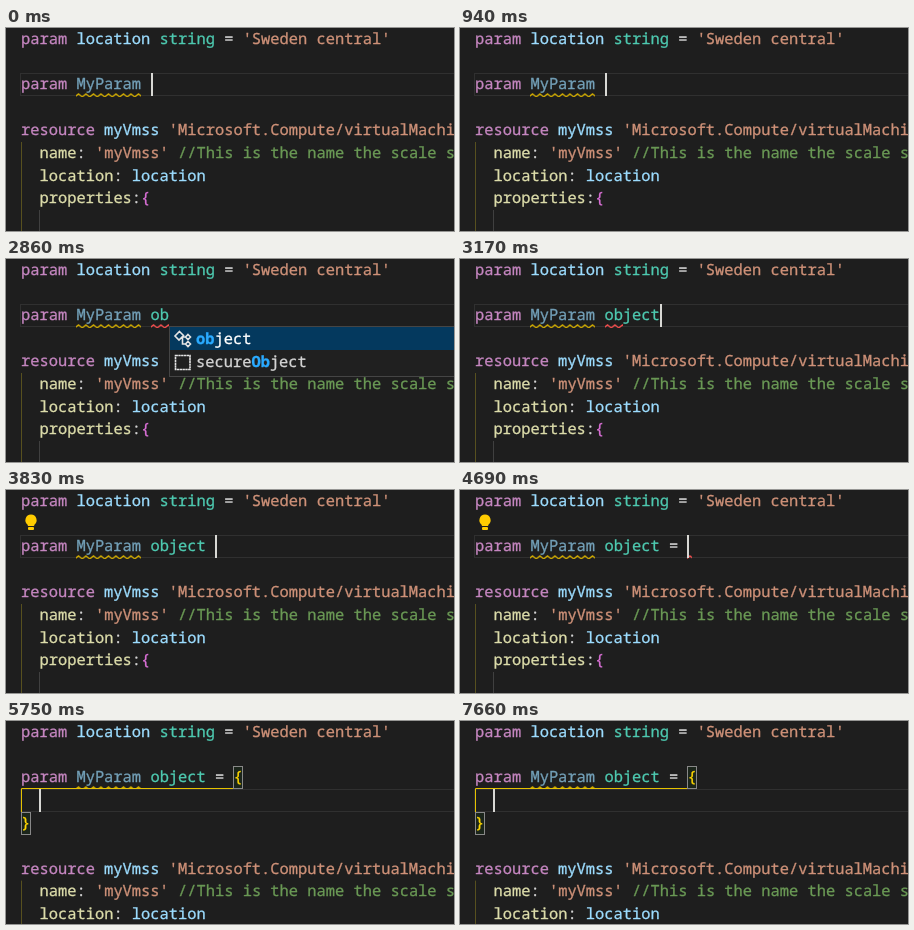
These frames come from a looping animation (448 px wide and 203 px high, 8000 ms). An HTML page:

```html
<!DOCTYPE html>
<html lang="en">
<head>
<meta charset="utf-8">
<title>Typing an object parameter</title>
<style>
  html, body { margin: 0; width: 100%; height: 100%; overflow: hidden; background: #1e1e1e; }
  svg { display: block; width: 448px; height: 203px; }
  text {
    font: 15.4px "Noto Sans Mono", "DejaVu Sans Mono", monospace;
    white-space: pre;
    text-rendering: geometricPrecision;
    color: #d4d4d4;
  }
  text, tspan { fill: currentColor; stroke: currentColor; stroke-width: .3; }
  .kw { color: #c586c0; }
  .var { color: #9cdcfe; }
  .unused { color: #73a0b8; }
  .type { color: #4ec9b0; }
  .str { color: #ce9178; }
  .note { color: #6a9955; }
  .prop { color: #dcdcaa; }
  .gold { color: #ffd700; }
  .pink { color: #da70d6; }
  .white { color: #fff; }
  .hit { color: #2aaaff; font-weight: 700; }
  .guide { stroke: #404040; }
  .pair { fill: none; stroke: #e6c200; }
  .dim { stroke: #57501f; }
  .line { fill: none; stroke: #303030; }
  .cursor { fill: #d8d8d4; }
  .box { fill: rgba(0, 100, 0, .1); stroke: #888; }
  .panel { fill: #202020; stroke: #454545; }
  .picked { fill: #04395e; }
  .icon { fill: none; stroke: #e4e4e4; stroke-width: 1.6; }
  .wave { fill: none; stroke-width: 1.3; }
  [data-on] { visibility: hidden; }
</style>
</head>
<body>
<svg viewBox="0 0 448 203">
  <defs>
    <pattern id="warn" width="7.5" height="4" x="70" y="65" patternUnits="userSpaceOnUse">
      <path class="wave" d="M-1.25 3.9 L0 2.9 L2.5 .9 L6.25 3.9 L8.75 1.9" stroke="#cca700"/>
    </pattern>
    <pattern id="error" width="7.5" height="4" x="145" y="65" patternUnits="userSpaceOnUse">
      <path class="wave" d="M-1.25 3.9 L0 2.9 L2.5 .9 L6.25 3.9 L8.75 1.9" stroke="#f14c4c"/>
    </pattern>
    <path id="classIcon" class="icon" d="M5.5 .5 L9.5 4.5 L5 9 L1 5 Z M8 6 H12 M8.5 6 V13 H12 M14 3.5 L16.5 6 L14 8.5 L11.5 6 Z M14 10.5 L16.5 13 L14 15.5 L11.5 13 Z"/>
    <path id="snippetIcon" class="icon" d="M1 12 V1 H14 V12 M1 14 H14" stroke-dasharray="3 .8"/>
    <path id="functionIcon" d="M8 0 L15 4 V11 L8 15 L1 11 V4 Z M1 4 L8 8 L15 4 M8 8 V15" fill="none" stroke="#b180d7" stroke-width="1.3"/>
  </defs>

  <!-- Current line -->
  <rect class="line" x="14.5" y="45.5" width="440" height="22" data-on="0-5750"/>
  <rect class="line" x="14.5" y="68.5" width="440" height="22" data-on="5750-8000"/>

  <!-- Parameters -->
  <text x="15" y="15.75"><tspan class="kw">param</tspan> <tspan class="var">location</tspan> <tspan class="type">string</tspan> = <tspan class="str">'Sweden central'</tspan></text>
  <text x="15" y="61.35"><tspan class="kw">param</tspan> <tspan class="unused">MyParam</tspan></text>
  <rect x="70" y="65" width="65" height="4" fill="url(#warn)" data-on="0-5750"/>
  <rect x="70" y="65" width="65" height="2" fill="url(#warn)" data-on="5750-8000"/>

  <!-- Resource, pushed down by the two new lines -->
  <g id="resource">
    <path class="dim" d="M15.5 114 V203"/>
    <path class="guide" d="M33.5 182 V203"/>
    <text x="15" y="106.95"><tspan class="kw">resource</tspan> <tspan class="var">myVmss</tspan> <tspan class="str">'Microsoft.Compute/virtualMachineScaleSets</tspan></text>
    <text x="33.5" y="129.75"><tspan class="prop">name</tspan>: <tspan class="str">'myVmss'</tspan> <tspan class="note">//This is the name the scale set</tspan></text>
    <text x="33.5" y="152.55"><tspan class="prop">location</tspan>: <tspan class="var">location</tspan></text>
    <text x="33.5" y="175.35"><tspan class="prop">properties</tspan>:<tspan class="pink">{</tspan></text>
  </g>

  <!-- Typed text -->
  <text x="144.4" y="61.35" data-on="2170-2290"><tspan class="var">o</tspan></text>
  <text x="144.4" y="61.35" data-on="2290-3170"><tspan class="type">ob</tspan></text>
  <text x="144.4" y="61.35" data-on="3170-8000"><tspan class="type">object</tspan></text>
  <text x="209" y="61.35" data-on="4250-8000">=</text>
  <g fill="url(#error)">
    <rect x="145" y="65" width="9" height="4" data-on="2220-2490"/>
    <rect x="145" y="65" width="18" height="4" data-on="2490-3230"/>
    <rect x="218" y="65" width="5" height="4" data-on="4310-4570"/>
    <rect x="227" y="65" width="5" height="4" data-on="4570-5750"/>
  </g>

  <!-- Bracket pair -->
  <g data-on="5750-8000">
    <path class="pair" d="M228 67.5 H15.5 V91"/>
    <rect class="box" x="227.5" y="45.5" width="9" height="22"/>
    <rect class="box" x="15.5" y="91.5" width="9" height="22"/>
    <text x="227.5" y="61.35"><tspan class="gold">{</tspan></text>
    <text x="15" y="106.95"><tspan class="gold">}</tspan></text>
  </g>

  <!-- Light bulb -->
  <g fill="#ffcc00" data-on="3470-4070 4690-5000">
    <path d="M25 24.5 A5.8 5.8 0 0 1 28.2 35 V36 H21.8 V35 A5.8 5.8 0 0 1 25 24.5 Z"/>
    <rect x="22" y="37" width="6" height="3" rx="1"/>
  </g>

  <!-- Suggestions -->
  <g data-on="2380-3170">
    <rect class="panel" x="163.5" y="67.5" width="300" height="50"/>
    <rect class="picked" x="164" y="68" width="300" height="23"/>
    <use href="#classIcon" x="168" y="72"/>
    <path class="icon" d="M169.5 96.5 H184 V110.5 H169.5 Z" stroke-dasharray="2.4 .4"/>
    <text x="190" y="84.5"><tspan class="hit">ob</tspan><tspan class="white">ject</tspan></text>
    <text x="190" y="107.5">secure<tspan class="hit">Ob</tspan>ject</text>
  </g>
  <g data-on="4750-5750">
    <rect class="panel" x="227.5" y="67.5" width="240" height="150"/>
    <rect class="picked" x="228" y="68" width="240" height="23"/>
    <use href="#snippetIcon" x="233" y="72"/>
    <use href="#functionIcon" x="232" y="95"/>
    <use href="#functionIcon" x="232" y="118"/>
    <use href="#functionIcon" x="232" y="141"/>
    <use href="#functionIcon" x="232" y="164"/>
    <use href="#functionIcon" x="232" y="187"/>
    <text x="254" y="84.5"><tspan class="white">{}</tspan></text>
    <text x="254" y="107.5">any</text>
    <text x="254" y="130.5">array</text>
    <text x="254" y="153.5">base64</text>
    <text x="254" y="176.5">base64ToJson</text>
    <text x="254" y="199.5">base64ToString</text>
  </g>

  <!-- Cursor -->
  <g class="cursor">
    <rect x="145" y="45" width="2" height="23" data-on="0-440 940-1430 1920-2170"/>
    <rect x="154" y="45" width="2" height="23" data-on="2170-2290"/>
    <rect x="163" y="45" width="2" height="23" data-on="2290-2860"/>
    <rect x="200" y="45" width="2" height="23" data-on="3170-3640"/>
    <rect x="209" y="45" width="2" height="23" data-on="3830-4250"/>
    <rect x="218" y="45" width="2" height="23" data-on="4250-4570"/>
    <rect x="227" y="45" width="2" height="23" data-on="4570-5250"/>
    <rect x="33" y="68" width="2" height="23" data-on="5750-6240 6730-7230 7660-8000"/>
  </g>
</svg>
<script>
  const LOOP = 8000, ENTER = 5750, LINE = 22.8;
  const resource = document.getElementById('resource');
  const timed = [...document.querySelectorAll('[data-on]')].map(el => ({
    el,
    spans: el.dataset.on.split(' ').map(span => span.split('-').map(Number))
  }));
  const start = performance.now();

  function draw(now) {
    const t = Math.max(0, now - start) % LOOP;
    for (const { el, spans } of timed) {
      const on = spans.some(([from, to]) => t >= from && t < to);
      el.style.visibility = on ? 'visible' : 'hidden';
    }
    resource.setAttribute('transform', `translate(0 ${t >= ENTER ? 2 * LINE : 0})`);
    requestAnimationFrame(draw);
  }
  draw(start);
</script>
</body>
</html>
```
